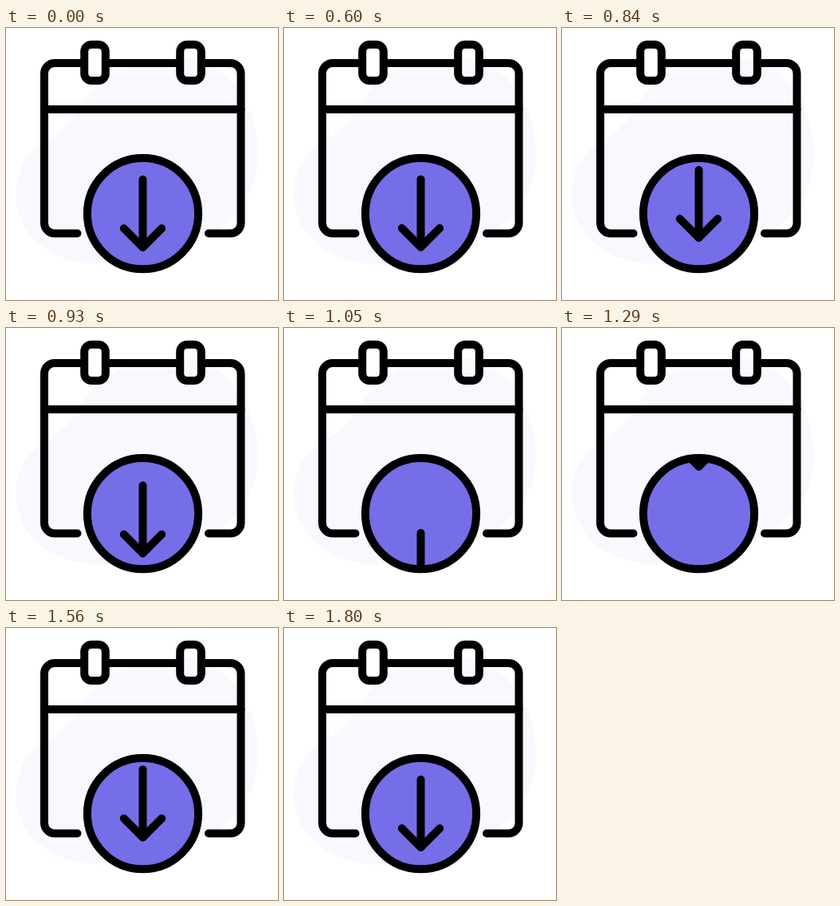
An HTML page with a canvas that plays this animation: 341x341 px, repeating every 2.76 s.

```html
<!DOCTYPE html>
<html lang="en">
<head>
<meta charset="utf-8">
<title>Calendar download</title>
<style>
  html, body { margin: 0; width: 100%; height: 100%; overflow: hidden; background: #fff; }
  canvas { display: block; width: 100vmin; height: 100vmin; }
</style>
</head>
<body>
<canvas id="stage"></canvas>
<script>
const SIZE = 341, LOOP = 2760, STEP = 30;
const BADGE = { x: 171.5, y: 232.7, r: 69.6 };
const canvas = document.getElementById('stage');
const ctx = canvas.getContext('2d');
const scale = window.devicePixelRatio || 1;
canvas.width = canvas.height = Math.round(SIZE * scale);

// Cubic bezier easing, solved by bisection
function bezier(x1, y1, x2, y2) {
  const at = (a, b, s) => 3 * a * s * (1 - s) ** 2 + 3 * b * s * s * (1 - s) + s ** 3;
  return x => {
    let lo = 0, hi = 1;
    for (let i = 0; i < 30; i++) {
      const mid = (lo + hi) / 2;
      if (at(x1, x2, mid) < x) lo = mid; else hi = mid;
    }
    return at(y1, y2, lo);
  };
}
const settle = bezier(0.4, 0, 0.2, 1);

// Vertical shift of the arrow: wind up, drop out, come back from above
function arrowShift(t) {
  if (t < 580 || t >= 1800) return 0;
  if (t < 780) return -7.5 * (1 - Math.cos(Math.PI * (t - 580) / 200));
  if (t < 1170) return -15 + 82 * ((t - 780) / 270) ** 2.2;
  return -115 * (1 - settle((t - 1170) / 630));
}

function line(...pts) {
  ctx.beginPath();
  pts.forEach(([x, y]) => ctx.lineTo(x, y));
  ctx.stroke();
}

function blob() {
  ctx.fillStyle = '#f8f9ff';
  ctx.beginPath();
  ctx.moveTo(12, 207);
  ctx.bezierCurveTo(12, 177, 28, 155, 50, 142);
  ctx.bezierCurveTo(68, 131, 84, 118, 95, 97);
  ctx.bezierCurveTo(114, 60, 160, 37, 215, 37);
  ctx.bezierCurveTo(277, 37, 316, 96, 316, 160);
  ctx.bezierCurveTo(316, 225, 265, 262, 210, 280);
  ctx.bezierCurveTo(175, 292, 145, 297, 118, 296.5);
  ctx.bezierCurveTo(55, 295, 12, 258, 12, 207);
  ctx.fill();
}

function calendar() {
  const l = 48, r = 294.5, top = 44, bottom = 257.5, c = 13;
  ctx.beginPath();
  ctx.moveTo(89.5, bottom);
  ctx.arcTo(l, bottom, l, top, c);
  ctx.arcTo(l, top, r, top, c);
  ctx.lineTo(98, top);
  ctx.moveTo(125, top);
  ctx.lineTo(218, top);
  ctx.moveTo(245, top);
  ctx.arcTo(r, top, r, bottom, c);
  ctx.arcTo(r, bottom, l, bottom, c);
  ctx.lineTo(254, bottom);
  ctx.stroke();
  line([l, 102], [r, 102]);
  for (const x of [98.2, 218.2]) {
    ctx.beginPath();
    ctx.roundRect(x, 20.7, 26.6, 45.4, 9);
    ctx.stroke();
  }
}

function badge(shift) {
  ctx.beginPath();
  ctx.arc(BADGE.x, BADGE.y, BADGE.r, 0, Math.PI * 2);
  ctx.fillStyle = '#756ee8';
  ctx.fill();
  ctx.save();
  ctx.clip();
  ctx.translate(BADGE.x, shift);
  line([0, 190], [0, 275]);
  line([-23.7, 251.3], [0, 275], [23.7, 251.3]);
  ctx.restore();
  ctx.beginPath();
  ctx.arc(BADGE.x, BADGE.y, BADGE.r, 0, Math.PI * 2);
  ctx.stroke();
}

function draw(t) {
  ctx.setTransform(scale, 0, 0, scale, 0, 0);
  ctx.fillStyle = '#fff';
  ctx.fillRect(0, 0, SIZE, SIZE);
  ctx.strokeStyle = '#000';
  ctx.lineWidth = 10;
  ctx.lineCap = ctx.lineJoin = 'round';
  blob();
  calendar();
  badge(arrowShift(t));
}

const start = performance.now();
function tick() {
  const t = (performance.now() - start) % LOOP;
  draw(Math.floor(t / STEP) * STEP);
  requestAnimationFrame(tick);
}
tick();
</script>
</body>
</html>
```
